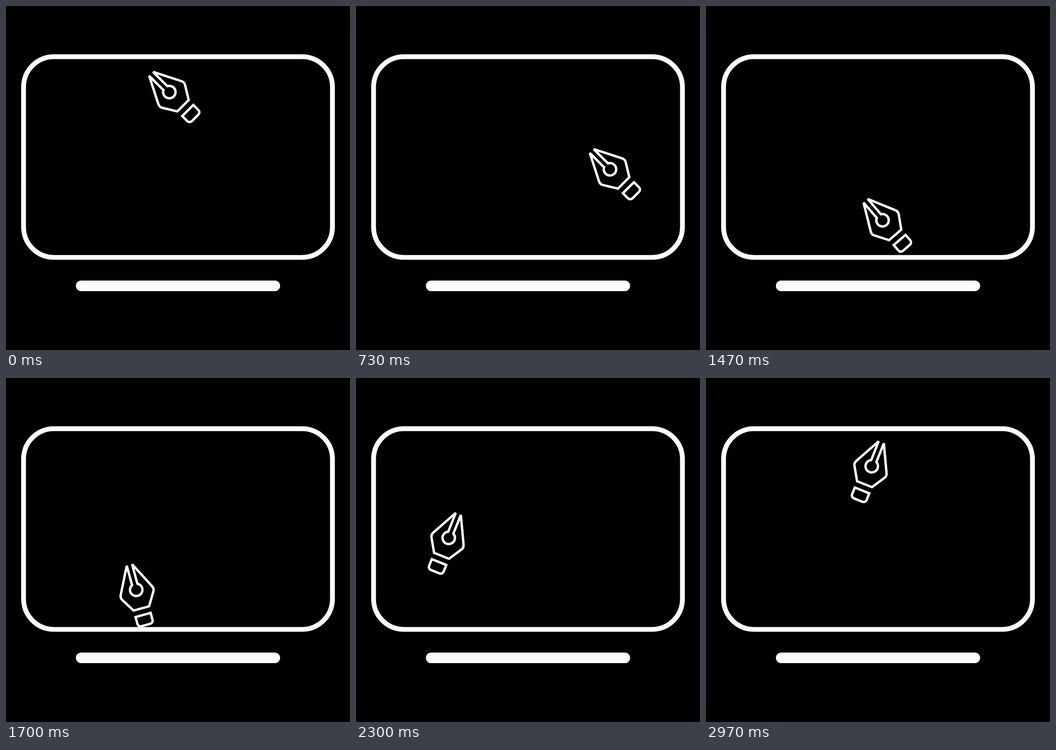
An HTML page for the animation above (3 s loop, 748 px wide and 748 px high).

```html
<!DOCTYPE html>
<html lang="en">
<head>
<meta charset="utf-8">
<title>Pen on screen</title>
<style>
  html, body { margin: 0; width: 100%; height: 100%; overflow: hidden; background: #000; }
  svg { display: block; width: 100vw; height: 100vh; }
</style>
</head>
<body>
<svg viewBox="0 0 748 748" fill="none" stroke="#fdfdfd">
  <rect x="38.2" y="110.2" width="671.6" height="436.4" rx="66" stroke-width="10.4"/>
  <rect x="152" y="597" width="444" height="23" rx="11.5" fill="#fdfdfd" stroke="none"/>
  <g id="pen" stroke-width="5.2" stroke-miterlimit="3">
    <!-- nib with keyhole slit, then the collar; the hole is centred on 0,0 -->
    <path d="M6-56 L35 1 Q38.5 7.5 35.5 12.5 L17.5 42 H-17.5 L-35.5 12.5 Q-38.5 7.5 -35 1
             L-6-56 V-12.1 A13.5 13.5 0 1 0 6-12.1 Z"/>
    <path d="M-17 56.7 H17 V72.3 a7 7 0 0 1 -7 7 H-10 a7 7 0 0 1 -7 -7 Z"/>
  </g>
</svg>
<script>
  const LOOP = 3000, LEG = 1000, FRAME = 1000 / 30;
  const PIVOT = 12.5;
  const TURN = { start: 1355, end: 2100, from: -45, to: 21.8 };

  // One curve per second, each travelled at constant speed.
  const legs = [
    'M364 196 C453 264.5 632 402.5 598.5 444',
    'M598.5 444 C564.5 485.5 194 486 155 445',
    'M155 445 C128 410 285 266.5 364 196'
  ].map(d => {
    const path = document.createElementNS('http://www.w3.org/2000/svg', 'path');
    path.setAttribute('d', d);
    return { path, length: path.getTotalLength() };
  });

  const pen = document.getElementById('pen');
  const smooth = u => u * u * (3 - 2 * u);
  const clamp = u => Math.min(1, Math.max(0, u));

  function draw(t) {
    const { path, length } = legs[Math.min(2, Math.floor(t / LEG + 1e-6))];
    const p = path.getPointAtLength(length * ((t / LEG + 1e-6) % 1));
    const u = smooth(clamp((t - TURN.start) / (TURN.end - TURN.start)));
    const angle = TURN.from + (TURN.to - TURN.from) * u;
    pen.setAttribute('transform',
      `translate(${p.x} ${p.y}) rotate(${angle}) translate(0 ${-PIVOT})`);
  }

  const begin = performance.now();
  function tick() {
    const t = (performance.now() - begin) % LOOP;
    // Poses are held for a thirtieth of a second.
    draw(Math.floor((t + 5) / FRAME) % 90 * FRAME);
    requestAnimationFrame(tick);
  }
  tick();
</script>
</body>
</html>
```
